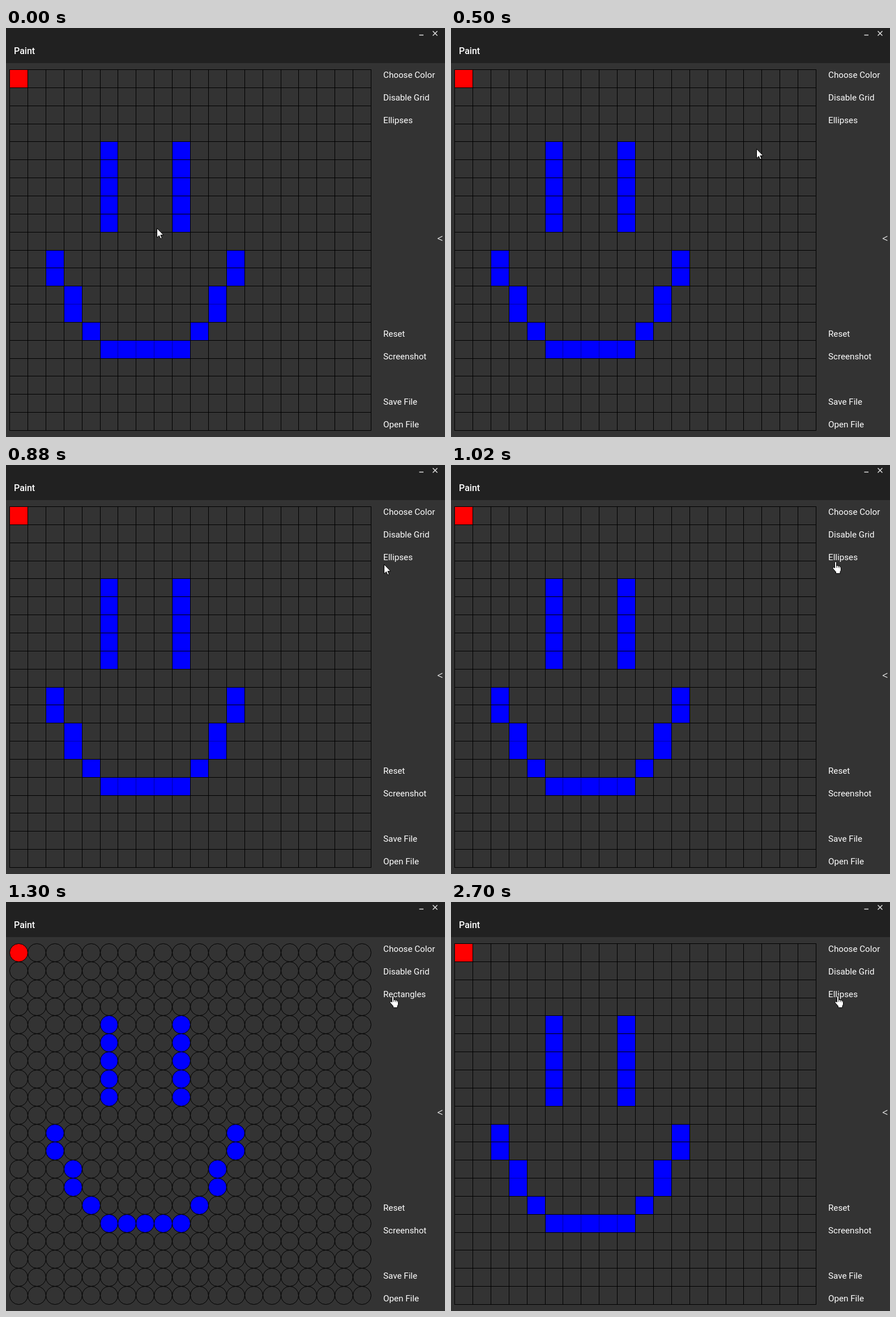
An HTML page that plays this animation: 775x722 px, repeating every 3.39 s.

```html
<!DOCTYPE html>
<html lang="en">
<head>
<meta charset="utf-8">
<title>Paint</title>
<style>
  html, body { margin: 0; width: 100%; height: 100%; overflow: hidden; background: #333; }
  svg { display: block; width: 775px; height: 722px; }
  text { font: 15.2px Roboto, sans-serif; fill: #fff; }
  .title { font-size: 16px; font-weight: 500; }
  .arrow { font: 18px "Noto Sans", sans-serif; fill: #e6e6e6; }
  #squares { shape-rendering: crispEdges; }
</style>
</head>
<body>
<svg id="stage" viewBox="0 0 775 722">
  <rect width="775" height="722" fill="#333"/>
  <rect width="775" height="62" fill="#212121"/>
  <text class="title" x="14" y="46">Paint</text>
  <path d="M729.5 12.5h7.5M753.5 5.5l8 8M761.5 5.5l-8 8" fill="none" stroke="#ddd" stroke-width="1.5"/>
  <g id="squares"></g>
  <g id="circles"></g>
  <g id="menu"></g>
  <text class="arrow" x="761" y="378">&lt;</text>
  <circle id="press" cx="681" cy="165" r="12" fill="#ff0" fill-opacity=".5"/>
  <g id="cursor" stroke="#000" fill="#fff">
    <path id="pointer" d="M.5 .5V17L4.3 13.4L6.8 19L9.3 18L6.9 12.4H12Z"/>
    <g id="hand">
      <path d="M.5 2.5Q.5 .5 2 .5T3.5 2.5V8Q5.5 6.8 6.5 8.4Q8.3 7.4 9.3 9Q11.5 8.4 11.5 11V15Q11.5 17 10 18.5V21.5H2.5V19Q.5 16.5 -3 12.5Q-3.5 10.3 -1 10.5L.5 12Z"/>
      <path d="M3.5 8v3.5M6.5 8.5v3M9.3 9v3" fill="none" stroke-width=".8"/>
    </g>
  </g>
</svg>
<script>
const NS = 'http://www.w3.org/2000/svg';
const $ = id => document.getElementById(id);
const LOOP = 3390, CELLS = 20;
const RED = '#f00', BLUE = '#00f';

function add(parent, tag, attrs) {
  const el = document.createElementNS(NS, tag);
  for (const key in attrs) el.setAttribute(key, attrs[key]);
  return parent.appendChild(el);
}

const gridX = i => Math.round(6 + 31.9 * i);
const gridY = i => Math.round(73 + 31.85 * i);

// The face is symmetric about column 7.
function cellColor(col, row) {
  if (!col && !row) return RED;
  const c = Math.min(col, 14 - col);
  const eye = c === 5 && row >= 4 && row <= 8;
  const cheek = c === 2 && (row === 10 || row === 11) ||
                c === 3 && (row === 12 || row === 13) ||
                c === 4 && row === 14;
  const mouth = row === 15 && c >= 5;
  return eye || cheek || mouth ? BLUE : 'none';
}

function buildGrid() {
  for (let row = 0; row < CELLS; row++) {
    for (let col = 0; col < CELLS; col++) {
      const x = gridX(col) + .5, y = gridY(row) + .5;
      const width = gridX(col + 1) + .5 - x, height = gridY(row + 1) + .5 - y;
      const fill = cellColor(col, row), stroke = '#000';
      add($('squares'), 'rect', { x, y, width, height, fill, stroke });
      add($('circles'), 'ellipse', {
        cx: x + width / 2, cy: y + height / 2, rx: width / 2, ry: height / 2, fill, stroke
      });
    }
  }
  // Softer seams inside the smile.
  let seams = '';
  for (let col = 6; col < 10; col++) seams += `M${gridX(col) + .5} ${gridY(15) + 1}V${gridY(16)}`;
  for (const col of [3, 11]) seams += `M${gridX(col) + 1} ${gridY(13) + .5}H${gridX(col + 1)}`;
  add($('squares'), 'path', { d: seams, stroke: '#0000a8', fill: 'none' });
}

function label(text, y) {
  const el = add($('menu'), 'text', { x: 666, y });
  el.textContent = text;
  return el;
}

buildGrid();
label('Choose Color', 88);
label('Disable Grid', 128);
const shapeLabel = label('Ellipses', 168);
label('Reset', 545);
label('Screenshot', 585);
label('Save File', 665);
label('Open File', 705);

const mix = (a, b, p) => a + (b - a) * p;
const glide = (p, power) => 1 - (1 - p ** 1.3) ** power;

// The pointer moves in 18 ticks: a long sweep, then a short approach.
function pointerAt(t) {
  const tick = t < 260 ? 0 : Math.min(18, Math.floor((t - 260) / 47.6) + 1);
  if (tick <= 11) {
    const p = tick / 11;
    return [mix(266, 646, glide(p, 2.09)), mix(353, 182, glide(p, 2.83))];
  }
  const p = (tick - 11) / 7;
  return [mix(646, 681, 1 - (1 - p) ** 1.64), mix(182, 165, p)];
}

const show = (id, on) => $(id).setAttribute('display', on ? 'inline' : 'none');

function render(t) {
  const [x, y] = pointerAt(t).map(Math.round);
  const overButton = x > 660 && y < 173;
  const round = t >= 1300 && t < 2700;
  $('cursor').setAttribute('transform', `translate(${x} ${y})`);
  show('pointer', !overButton);
  show('hand', overButton);
  show('squares', !round);
  show('circles', round);
  show('press', t >= 1210 && t < 1300 || t >= 2560 && t < 2700);
  shapeLabel.textContent = round ? 'Rectangles' : 'Ellipses';
}

const start = performance.now();
function loop() {
  render((performance.now() - start) % LOOP);
  requestAnimationFrame(loop);
}
loop();
</script>
</body>
</html>
```
